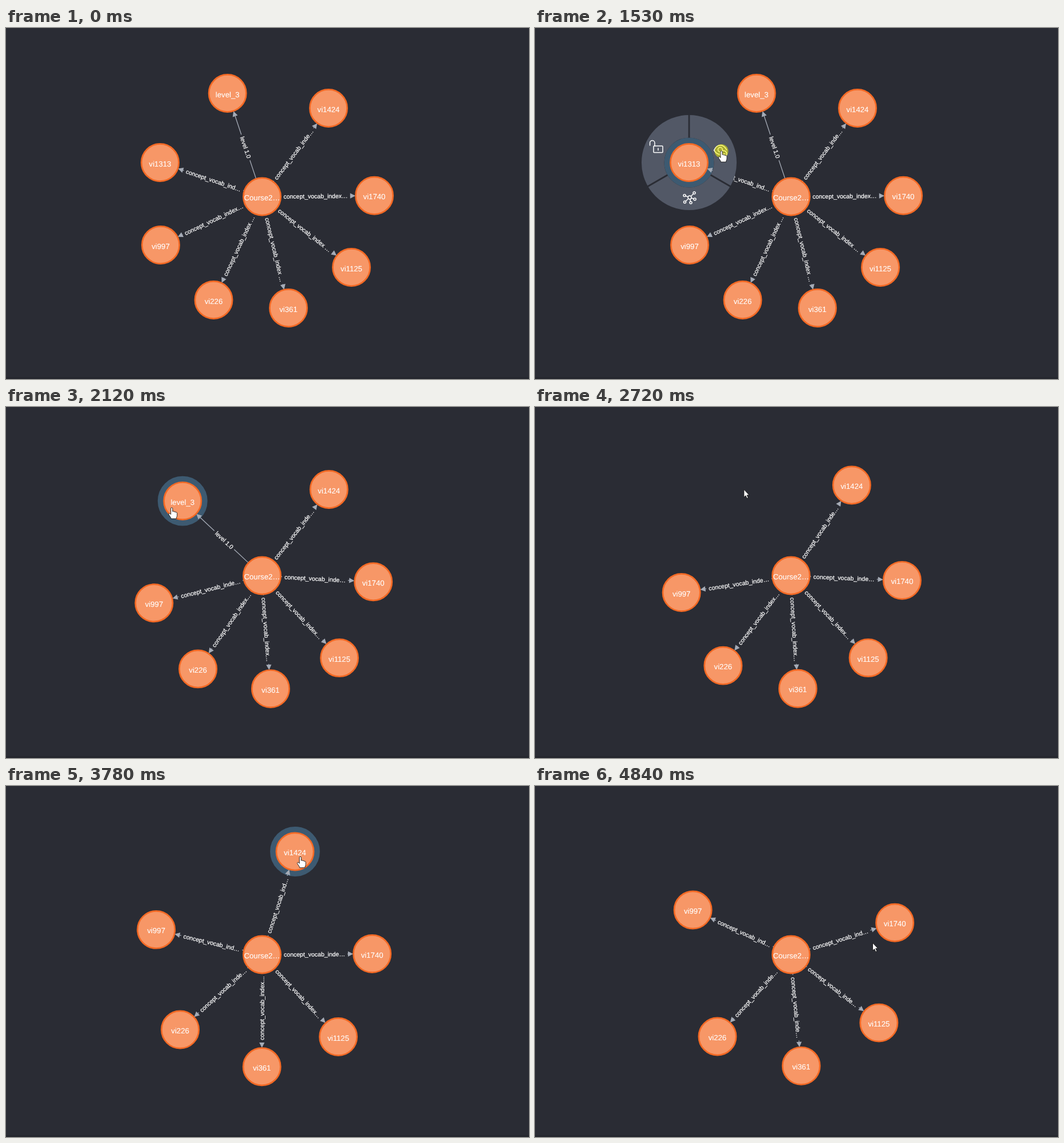
These frames come from a looping animation (913x613 px, 4.91 s). An HTML page:

```html
<!DOCTYPE html>
<html lang="en">
<head>
<meta charset="utf-8">
<title>Graph exploration</title>
<style>
  html, body { margin: 0; width: 100%; height: 100%; overflow: hidden; background: #2a2c34; }
  svg { display: block; width: 100vw; height: 100vh; }
  text { font-family: "Liberation Sans", Arial, sans-serif; fill: #fff; stroke: #fff; text-anchor: middle; text-rendering: geometricPrecision; }
  .name { font-size: 13.2px; stroke-width: .12; }
  .label { font-size: 10.5px; stroke-width: .25; }
  .node { fill: #f79767; stroke: #f36924; stroke-width: 2.7; }
  .halo { fill: none; stroke: #3d5a71; stroke-width: 10.5; }
  .shaft { stroke: #a5abb6; stroke-width: 1.3; }
  .head { fill: #a5abb6; }
  .menu { fill: none; stroke: #525866; }
  .gap { stroke: #2a2c34; stroke-width: 2.8; }
  .icon { fill: none; stroke: #fff; stroke-width: 1.5; stroke-linecap: round; stroke-linejoin: round; }
  .badge { fill: #525866; }
  .press { fill: #ff0; fill-opacity: .5; }
  .cursor { fill: #fff; stroke: #111; stroke-width: .9; stroke-linejoin: round; }
</style>
</head>
<body>
<svg viewBox="0 0 913 613" xmlns="http://www.w3.org/2000/svg">
  <rect width="913" height="613" fill="#2a2c34"/>
  <rect y="610" width="913" height="3" fill="#24262d"/>
  <g id="scene"></g>
</svg>
<script>
const LOOP = 4910, TICKS = 74;          // all times below are in ticks
const HUB = { x: 447, y: 294.5 };
const EDGE = 33, HEAD = 9.2, LABEL_SIZE = 10.5, LABEL_PAD = 8.2;
const SETTLE = 8, GRIP = 38, EYE = { x: 56.5, y: -20 };

// Clockwise around the hub; the first three are hidden in this order.
const nodes = [
  { name: "vi1313", x: 269, y: 235 },
  { name: "level_3", x: 386.7, y: 114 },
  { name: "vi1424", x: 563, y: 140 },
  { name: "vi1740", x: 643, y: 292.7 },
  { name: "vi1125", x: 603, y: 418 },
  { name: "vi361", x: 493, y: 489 },
  { name: "vi226", x: 362.5, y: 475 },
  { name: "vi997", x: 270, y: 379 }
];

// One visit per hidden node; turns are the degrees the remaining nodes swing.
const visits = [
  { leave: 6, arrive: 9, press: 14, turn: 15, eye: 20, gone: 25, grip: { x: 20, y: 2 },
    turns: [-28.3, .9, 3.7, 8.4, 9, 9.4, 11.3] },
  { leave: 29, arrive: 32, press: 34, turn: 34, eye: 39, gone: 41, grip: { x: -19, y: 12 },
    turns: [-20.1, -3.6, .4, 4.4, 13, 27.5], away: { t: 47, x: 347.5, y: 158.5 } },
  { leave: 51, arrive: 58, press: 60, turn: 65, eye: 67, gone: 70, grip: { x: 37, y: 3.5 },
    turns: [-24.5, -13.7, -7.8, -8.1, 16.4], away: { t: 73, x: 589.5, y: 274 } }
];

const HAND = "M-1.6 1C-1.6-.8 1.6-.8 1.6 1V6.5C2.2 5.5 4.3 5.7 4.4 7.2C5 6.3 7 6.6 7 8C7.8 7.3 9.5 7.8 9.5 9.4V13C9.5 15.5 8 16.5 8 19H-1C-1.5 16.5-4 14-5 12C-6 10.3-4.3 9-3 10L-1.6 11.5Z";
const ARROW = "M0 0V13.5L3 10.7L5.2 15.5L7.4 14.5L5.2 9.8H9.3Z";
const ICONS = `<g class="icon">
  <rect x="-62" y="-29" width="16" height="11.5" rx="1"/>
  <path d="M-60-29V-34.3a4.2 4.2 0 0 0-8.4 0V-30M-54-25V-21.5"/>
  <path d="M43.5-21.5C49-33 60-33 65.5-22M43.5-21.5Q47.5-15.5 52.5-14.2"/>
  <circle cx="54.3" cy="-22.5" r="3.9"/>
  <circle class="badge" cx="60" cy="-15" r="5.8"/><path d="M57.2-15H62.8"/>
  <path d="M9 53L1 61L10 64M3 70L1 61L-7.5 69M1 61L-8 57.5"/>
  <g class="badge"><circle cx="9" cy="53" r="2"/><circle cx="10" cy="64" r="2"/><circle cx="3" cy="70" r="2"/>
  <circle cx="-7.5" cy="69" r="2"/><circle cx="-8" cy="57.5" r="2"/><circle cx="1" cy="61" r="3"/></g></g>`;

const scene = document.getElementById("scene");
const ruler = document.createElement("canvas").getContext("2d");
ruler.font = '100px "Liberation Sans", Arial, sans-serif';

const clamp = v => Math.min(1, Math.max(0, v));
const mix = (a, b, p) => a + (b - a) * p;
const settle = v => 1 - (1 - v) ** 1.65;
const inOut = v => v < .5 ? 4 * v ** 3 : 1 - 4 * (1 - v) ** 3;
const widthOf = s => ruler.measureText(s).width * LABEL_SIZE / 100;
const rad = deg => deg * Math.PI / 180;

// Crowded nodes are pushed further out.
function spread(angles) {
  const n = angles.length;
  return angles.map((a, i) => {
    const room = (angles[(i + 1) % n] - angles[(i + n - 1) % n] + 720) % 360;
    return { a, d: 181 + 1333 / room };
  });
}

const stages = [nodes.map(({ x, y }) => ({
  a: Math.atan2(y - HUB.y, x - HUB.x) / rad(1),
  d: Math.hypot(x - HUB.x, y - HUB.y)
}))];
for (const v of visits) {
  const rest = stages.at(-1).slice(1);
  stages.push(spread(rest.map((s, i) => s.a + v.turns[i])));
}

function nodesAt(k) {
  const gone = visits.filter(v => k >= v.gone).length;
  const p = gone ? settle(clamp((k - visits[gone - 1].gone + 1) / SETTLE)) : 1;
  return stages[gone].map((to, i) => {
    const from = gone ? stages[gone - 1][i + 1] : to;
    const a = mix(from.a, to.a, p), d = mix(from.d, to.d, p);
    return { name: nodes[gone + i].name, visit: visits[gone + i], a, d,
      x: HUB.x + Math.cos(rad(a)) * d, y: HUB.y + Math.sin(rad(a)) * d };
  });
}

const path = [{ t: 6, x: 766, y: 597 }];
for (const v of visits) {
  const spot = nodesAt(v.press).find(n => n.visit === v);
  const by = (t, o) => ({ t, x: spot.x + o.x, y: spot.y + o.y });
  path.push({ ...path.at(-1), t: v.leave }, by(v.arrive, v.grip), by(v.turn, v.grip), by(v.eye, EYE), by(v.gone, EYE));
  if (v.away) path.push(v.away);
}

function cursorAt(k) {
  if (k < path[0].t) return null;
  const i = path.findIndex(key => key.t > k);
  if (i < 0) return path.at(-1);
  const from = path[i - 1], to = path[i], p = (k - from.t) / (to.t - from.t);
  return { x: mix(from.x, to.x, p), y: mix(from.y, to.y, p) };
}

function fit(text, room) {
  if (widthOf(text) <= room) return text;
  let n = text.length - 1;
  while (n > 0 && widthOf(text.slice(0, n) + "…") > room) n--;
  return text.slice(0, n) + "…";
}

function edge({ name, a, d }) {
  const end = d - EDGE - HEAD, mid = (EDGE + end) / 2;
  const label = name.startsWith("level") ? "level 1.0" : "concept_vocab_index 1.0";
  const text = fit(label, end - EDGE - LABEL_PAD);
  const half = (widthOf(text) + LABEL_PAD) / 2;
  const flip = Math.cos(rad(a)) < 0 ? 180 : 0;
  return `<g transform="translate(${HUB.x} ${HUB.y}) rotate(${a})">
    <path class="shaft" d="M${EDGE} 0H${mid - half}M${mid + half} 0H${end}"/>
    <path class="head" d="M${d - EDGE} 0l${-HEAD}-4.6v9.2z"/>
    <text class="label" transform="translate(${mid} 0) rotate(${flip})" y="3.8">${text}</text></g>`;
}

function menu(p) {
  const inner = 43.5, outer = mix(inner, 83, p);
  const gaps = [-90, 30, 150].map(a =>
    `<path class="gap" transform="rotate(${a})" d="M${inner} 0H${outer + .5}"/>`).join("");
  return `<circle class="menu" r="${(inner + outer) / 2}" stroke-width="${outer - inner}"/>${gaps}
    <g transform="scale(${p})">${ICONS}</g>`;
}

function disc({ x, y, name, open = 0 }) {
  return `<g transform="translate(${x} ${y})">${open > 0 ? menu(open) : ""}
    <circle class="node" r="32.6"/><text class="name" y="6.6">${name}</text></g>`;
}

function draw(k) {
  const cur = cursorAt(k);
  const list = nodesAt(k).map(n => {
    const age = n.visit ? k - n.visit.press - 1 : -1;
    const near = cur && Math.hypot(cur.x - n.x, cur.y - n.y) < GRIP;
    return { ...n, lit: near || age >= 0, open: inOut(clamp(age / 3)) };
  });
  const lit = list.filter(n => n.lit);
  let out = lit.map(n => `<circle class="halo" cx="${n.x}" cy="${n.y}" r="38.2"/>`).join("")
    + list.map(edge).join("") + disc({ ...HUB, name: "Course2…" }) + list.map(disc).join("");
  if (cur) {
    const pressed = visits.some(v => k === v.press || k >= v.gone - 2 && k < v.gone);
    out += `<g transform="translate(${cur.x} ${cur.y})">
      ${pressed ? '<circle class="press" r="12"/>' : ""}
      <path class="cursor" d="${lit.length ? HAND : ARROW}"/></g>`;
  }
  scene.innerHTML = out;
}

const start = performance.now();
let shown = -1;
function loop() {
  const t = (performance.now() - start) % LOOP;
  const k = Math.min(TICKS - 1, Math.floor((t + 9) * TICKS / LOOP));
  if (k !== shown) draw(shown = k);
  requestAnimationFrame(loop);
}
loop();
</script>
</body>
</html>
```
